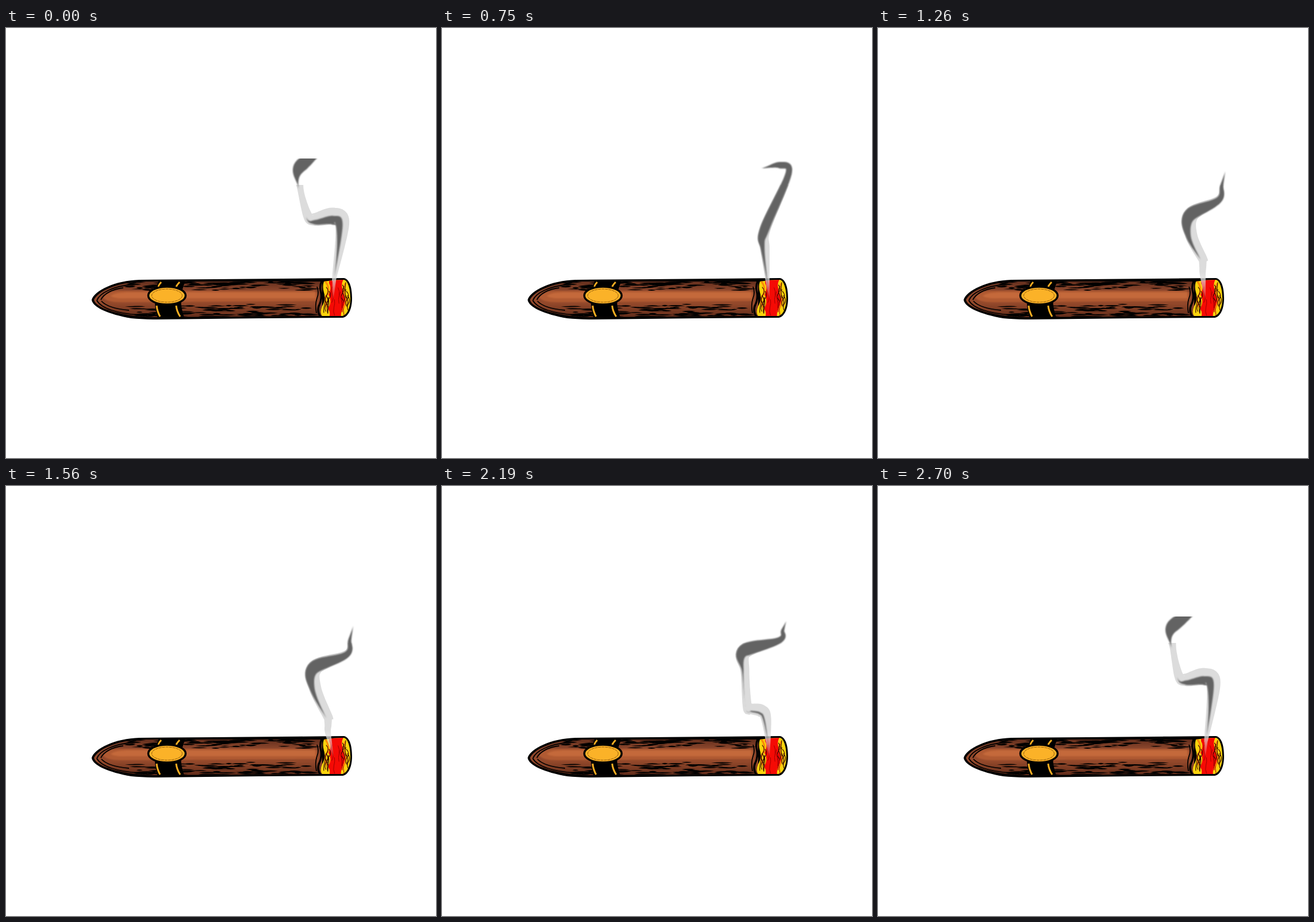
An HTML page that plays this animation: 748 by 748 pixels, repeating every 2.73 s.

```html
<!DOCTYPE html>
<html lang="en">
<head>
<meta charset="utf-8">
<title>Smoking cigar</title>
<style>
html, body { margin: 0; width: 100%; height: 100%; overflow: hidden; background: #fff; }
svg { display: block; width: 100vw; height: 100vh; }
</style>
</head>
<body>
<svg viewBox="0 0 748 748">
  <defs>
    <linearGradient id="leaf" x1="0" y1="438" x2="0" y2="506" gradientUnits="userSpaceOnUse">
      <stop offset="0" stop-color="#5c2a1a"/>
      <stop offset=".24" stop-color="#86432a"/>
      <stop offset=".6" stop-color="#94492b"/>
      <stop offset="1" stop-color="#5a2818"/>
    </linearGradient>
    <linearGradient id="haze" x1="0" y1="425" x2="0" y2="472" gradientUnits="userSpaceOnUse">
      <stop offset="0" stop-color="#dcdcdc"/>
      <stop offset="1" stop-color="#e6e6e6" stop-opacity="0"/>
    </linearGradient>
    <filter id="soft" x="-20%" y="-20%" width="140%" height="140%"><feGaussianBlur stdDeviation="1.3"/></filter>
    <clipPath id="body"><path d="M153 473C159 458 193 443 234 441H550V501L260 503C210 503 157 490 153 473Z"/></clipPath>
    <clipPath id="tip"><path d="M553 441Q570 438 588 438C595 440 599 454 599 470C599 486 594 499 585 501H550Q545 495 550 484Q557 472 553 460Q550 450 553 441Z"/></clipPath>
    <clipPath id="top"><path d="M0 227H748V748H0Z"/></clipPath>
    <clipPath id="paleTop"><path d="M0 273H748V748H0Z"/></clipPath>
  </defs>

  <path d="M149 473C153 457 190 439 232 438L365 437L588 435C598 437 602 452 602 470C602 488 596 502 586 504L440 505L262 507Q237 507 218 505C178 498 151 486 149 473Z"/>

  <g clip-path="url(#body)">
    <rect x="150" y="436" width="400" height="72" fill="url(#leaf)"/>
    <g filter="url(#soft)">
      <path d="M168 468Q176 457 200 457H535Q546 459 540 475L200 477Q174 477 168 468Z" fill="#b05a33"/>
      <path d="M182 466Q190 460 210 460H538V470H210Q188 471 182 466Z" fill="#c4693a"/>
    </g>
    <path id="grain"/>
    <g fill="none" stroke="#000" stroke-width="1.8">
      <path d="M158 474C163 461 186 449 222 446M165 473C170 462 186 454 204 452"/>
      <path d="M158 474C166 488 194 497 232 499M166 475C174 484 192 489 214 491"/>
      <path d="M549 441Q545 450 548 460Q550 472 544 484Q541 494 547 502" stroke-width="3.5"/>
      <path d="M541 450Q545 460 541 470Q537 482 540 496"/>
    </g>
    <path d="M267 436Q252 472 265 508H312Q296 472 314 436Z"/>
  </g>

  <path d="M270 442Q266 446 265 450M302 442Q298 446 296 450M262 483Q263 493 268 502M296 483Q297 493 303 502" fill="none" stroke="#f9ae22" stroke-width="3"/>
  <ellipse cx="280" cy="465.5" rx="32.5" ry="15.5" fill="#fbb228" stroke="#000" stroke-width="3.5"/>
  <ellipse cx="280" cy="465.5" rx="26.5" ry="11.5" fill="none" stroke="#8f5a08" stroke-dasharray="5 1"/>

  <g clip-path="url(#tip)">
    <rect x="544" y="434" width="58" height="72" fill="#f9d30c"/>
    <path d="M562 434H590Q580 444 587 458Q594 470 588 484Q580 494 584 506H561Q566 496 560 488Q568 476 561 464Q567 452 562 444Z" fill="#f50a05"/>
    <g fill="none">
      <path d="M555 440Q566 454 556 468Q553 478 559 486M590 444Q584 458 592 472Q590 484 584 494" stroke="#fb8a06" stroke-width="3"/>
      <path id="edgeFlames" stroke="#330600" stroke-width="1.1"/>
      <path id="coreFlames" stroke="#a10000"/>
    </g>
  </g>

  <g clip-path="url(#top)">
    <path id="pale" fill="url(#haze)" clip-path="url(#paleTop)"/>
    <path id="dark" fill="#646464" filter="url(#soft)"/>
  </g>
</svg>
<script>
const LOOP = 2730, STEP = 30, LIFE = 5900;
const SOURCE = [569, 470, 1, 0, 0];
const $ = id => document.getElementById(id);
const ramp = (t, from, to) => Math.max(0, Math.min(1, (t - from) / (to - from)));
const mix = (a, b, f) => a + (b - a) * f;

// Rising paths of the two bends: [age, x, y].
const CREST = [[800, 568, 460], [1260, 565, 430], [1890, 555, 430], [2400, 570, 388], [2730, 585, 342], [3120, 601, 296],
  [3480, 603, 253], [3990, 592, 298], [4620, 592, 285], [5130, 583, 254], [5460, 545, 210]];
const ELBOW = [[2700, 571, 440], [3120, 572, 362], [3480, 562, 350], [3990, 545, 325], [4620, 530, 306],
  [5130, 525, 274], [5460, 512, 243], [5850, 497, 203]];

function along(path, age) {
  const i = Math.max(1, path.findIndex(k => age <= k[0])), last = path[path.length - 1];
  if (age >= last[0]) return last.slice(1);
  const [a, ax, ay] = path[i - 1], [b, bx, by] = path[i], f = ramp(age, a, b);
  return [mix(ax, bx, f), mix(ay, by, f)];
}

// Knots are [x, y, half width, dark share of it, dark shift to the left].
function elbow(age) {
  const [x, y] = along(ELBOW, age);
  const born = ramp(age, 2400, 3000), swell = ramp(age, 3120, 3990);
  const shade = ramp(age, 3120, 3480), thin = ramp(age, 4620, 5130);
  return [
    [x, y + 36 * ramp(age, 2700, 3120), born * (6 + 4.5 * swell - 5 * thin), .4 * shade * (1 - thin), .5 * shade],
    [x, y, born * (7 + 6 * swell), .85 * shade, .1 * shade]
  ];
}

// The hump folds over to the left, thins out, then straightens into a tip.
function hump(age) {
  const [x, y] = along(CREST, age);
  const born = ramp(age, 800, 1260), grow = ramp(age, 1700, 2600), old = ramp(age, 2730, 3480);
  const late = ramp(age, 3120, 3480), straight = ramp(age, 3480, 3990), fold = grow * (1 - straight);
  const hx = mix(-48 * grow, 12, straight);
  const hy = mix(mix(-28, -9, grow), -48 + 28 * ramp(age, 4620, 5130), straight);
  const shade = ramp(age, 2050, 2500) * mix(.5, .9, old), shift = .45 * (1 - old);
  return [
    [x, y, born * mix(5, 12, grow) * (1 - .5 * old), shade, shift - .25 * straight],
    [x + hx / 2 + 8 * fold, y + hy / 2 - 10 * fold, born * mix(6, 15, grow) * (1 - .6 * old - .2 * straight), shade, shift],
    [x + hx, y + hy, born * mix(7, 11, grow) * (1 - late), shade * .7, shift],
    [x + hx - 12 * fold, y + hy - 6 * fold, born * 8 * (1 - late), 0, shift]
  ];
}

const spline = (a, b, c, d, u) =>
  b + u / 2 * (c - a + u * (2 * a - 5 * b + 4 * c - d + u * (3 * (b - c) + d - a)));

function smoke(t) {
  const knots = [SOURCE];
  for (let age = t; age < LIFE; age += LOOP) {
    if (age >= ELBOW[0][0]) knots.push(...elbow(age));
    if (age >= CREST[0][0]) knots.push(...hump(age));
  }
  const at = i => knots[Math.max(0, Math.min(knots.length - 1, i))], line = [];
  for (let i = 0; i < knots.length - 1; i++)
    for (let u = 0; u < 1; u += 1 / 12)
      line.push(SOURCE.map((_, c) => spline(at(i - 1)[c], at(i)[c], at(i + 1)[c], at(i + 2)[c], u)));
  line.push(at(knots.length));
  return line;
}

// Outline of the line, from one offset to the other on each side.
function ribbon(line, offsets) {
  const left = [], right = [];
  line.forEach((p, i) => {
    const a = line[Math.max(0, i - 1)], b = line[Math.min(line.length - 1, i + 1)];
    const dx = b[0] - a[0], dy = b[1] - a[1], len = Math.hypot(dx, dy) || 1;
    const [l, r] = offsets(p).map(o => `${(p[0] + dy / len * o).toFixed(1)} ${(p[1] - dx / len * o).toFixed(1)}`);
    left.push(l);
    right.unshift(r);
  });
  return 'M' + left.concat(right).join('L') + 'Z';
}
const paleSides = ([, , w]) => [Math.max(0, w), -Math.max(0, w)];
const darkSides = ([, , w, share, shift]) => {
  const half = Math.max(0, w) * Math.max(0, share), mid = Math.max(0, w) * shift;
  return [mid + half, mid - half];
};

let seed = 11;
const rand = (lo, hi) => lo + (hi - lo) * ((seed = seed * 16807 % 2147483647) / 2147483647);
const repeat = (n, make) => Array.from({ length: n }, make).join('');
const streaks = (n, edge, depth) => repeat(n, () => {
  const len = rand(10, 38), h = rand(1.2, 3);
  return `M${rand(205, 525)} ${edge + depth * rand(0, 1) ** 1.4}q${len / 2} ${-h} ${len} 0q${-len / 2} ${h} ${-len} 0`;
});
const flames = (n, lo, hi) => repeat(n, () =>
  `M${rand(lo, hi)} ${rand(440, 478)}q${rand(-7, 7)} 7 ${rand(-2, 2)} 14t${rand(-2, 2)} 14`);

$('grain').setAttribute('d', streaks(85, 442, 14) + streaks(110, 502, -22));
$('edgeFlames').setAttribute('d', flames(6, 552, 563) + flames(6, 584, 596));
$('coreFlames').setAttribute('d', flames(6, 564, 586));

function draw() {
  const line = smoke(Math.floor(performance.now() % LOOP / STEP) * STEP);
  $('pale').setAttribute('d', ribbon(line, paleSides));
  $('dark').setAttribute('d', ribbon(line, darkSides));
  requestAnimationFrame(draw);
}
draw();
</script>
</body>
</html>
```
